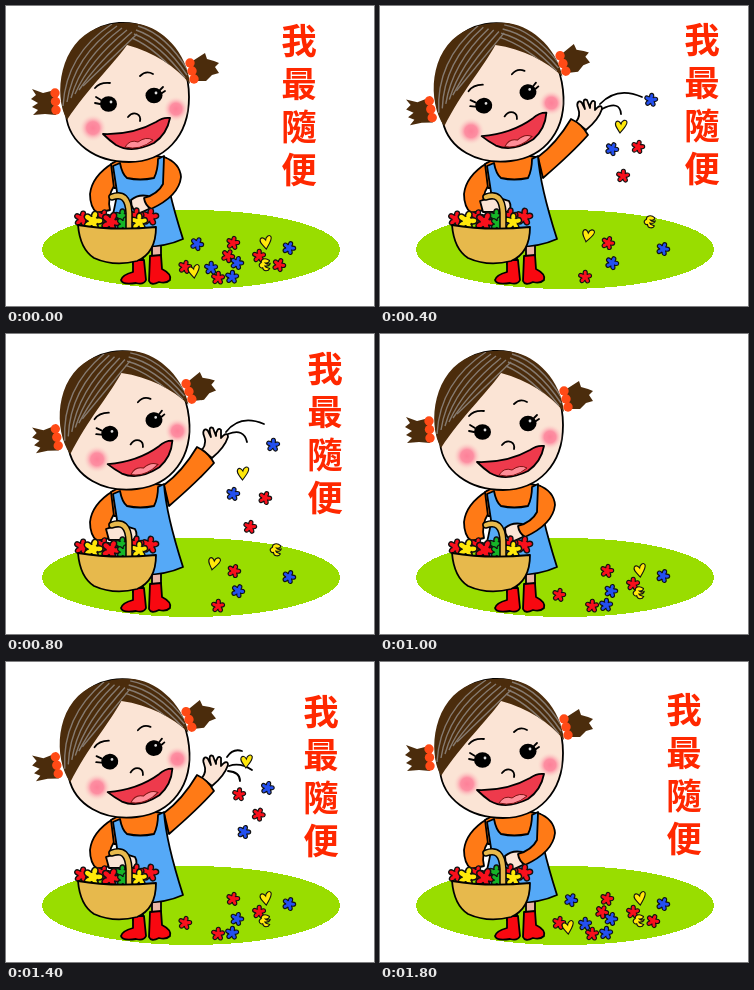
An HTML page that plays this animation: 368 px wide and 300 px high, repeating every 2000 ms.

```html
<!DOCTYPE html>
<html lang="zh-Hant">
<head>
<meta charset="utf-8">
<title>我最隨便</title>
<style>
html, body { margin: 0; width: 100%; height: 100%; overflow: hidden; background: #fff; }
svg { display: block; }
.ink { stroke: #000; stroke-width: 1.8; stroke-linejoin: round; stroke-linecap: round; }
.line { fill: none; }
.skin { fill: #fbe4d5; }
.leg { fill: #eab5a5; }
.orange { fill: #ff7a16; }
.blue { fill: #55a9f7; }
.red { fill: #f80810; }
.hair { fill: #4b2c0c; }
.tie { fill: #ff4a16; }
.bloom { stroke: #111; stroke-width: 1.1; }
#words { font: 700 35.5px "Noto Sans CJK TC", "Noto Sans CJK", "Noto Sans CJK JP", sans-serif; fill: #ff2800; text-anchor: middle; }
</style>
</head>
<body>
<svg width="368" height="300" viewBox="0 0 368 300">
  <defs>
    <radialGradient id="blush">
      <stop offset="0" stop-color="#fd8098"/>
      <stop offset=".45" stop-color="#fd8fa2"/>
      <stop offset="1" stop-color="#fbe4d5" stop-opacity="0"/>
    </radialGradient>
    <clipPath id="hairClip">
      <path id="hairShape" d="M61 114C47 88 54 37 91 22C106 16 121 16 133 18C156 22 181 46 184 78C170 61 148 46 121 39C106 60 82 82 61 114Z"/>
    </clipPath>
    <g id="flower"></g>
    <path id="heart" d="M-1 7C-4 2-7-1-5-4C-3-6-1-4 0-2C1-6 5-7 6-4C6 0 2 3-1 7Z"/>
    <path id="half" d="M4-5C-1-8-5-5-4-2C-8 1-4 4-2 3C-1 7 4 6 5 3C3 2 1 3 0 1C3 1 5 0 5-2C3-1 1-1 0-2C2-2 4-3 4-5Z"/>
  </defs>

  <ellipse cx="185" cy="243.5" rx="149" ry="39.5" fill="#99dd00" shape-rendering="crispEdges"/>
  <g id="ground"></g>

  <g class="ink">
    <path class="leg" d="M127 248H137V258H127ZM146 236H155V252H146Z"/>
    <path class="red" d="M127 254H138L140 274Q138 279 130 277Q116 279 115 274Q116 269 127 266Z"/>
    <path class="red" d="M144 250L155 249L156 263Q166 268 164 274Q160 278 153 276Q145 280 143 275Z"/>
    <path class="orange" d="M107 157Q86 170 84 188Q84 201 91 207L104 204Q101 191 108 180Z"/>
    <path class="orange" d="M105 158L120 150H150L160 152L161 182H108Z"/>
    <g id="waveArm">
      <path class="skin" d="M196 116C200 111 200 107 198 102C196 97 199 93 202 97L205 103C203 96 203 92 207 94L210 102C210 96 213 93 215 96L215 104C219 99 222 99 222 103C220 109 217 115 206 124Z"/>
      <path class="orange" d="M158 151Q176 138 191 113Q202 118 208 129Q192 147 163 172Z"/>
    </g>
    <path class="blue" d="M107 160L114 157Q116 168 121 172Q134 175 148 172Q152 164 152 153L158 150Q160 180 177 233Q155 243 125 240L102 225Q110 200 111 186Z"/>
    <g id="restArm">
      <path class="skin" d="M125 194Q132 188 142 190L147 201L134 207Q125 205 125 194Z"/>
      <path class="orange" d="M158 151Q174 157 175 171Q173 190 145 203Q139 199 138 192Q152 188 157 178Z"/>
    </g>
    <path id="foreArm" class="skin" d="M100 195Q114 189 129 195Q133 202 127 206L103 206Z"/>
    <g id="bunch"></g>
    <path class="line" d="M106 191Q122 185 123 207L123 223" stroke-width="7.500" style="stroke-width:7.500"/>
    <path class="line" d="M106 191Q122 185 123 207L123 223" style="stroke:#e7b94c;stroke-width:4.500"/>
    <path d="M72 219Q107 225 150 221Q150 247 131 255Q108 261 88 252Q74 243 72 219Z" fill="#e7b94c"/>
  </g>

  <g id="head">
    <path class="hair" d="M49 84L37 87L26 83L30 89L25 93L32 97L26 101L32 104L27 109L39 108L50 109Z"/>
    <path class="hair" d="M185 56L199 47L201 53L208 55L213 57L209 61L213 67L206 69L200 75L189 75Z"/>
    <path class="skin ink" d="M113 17C152 15 183 48 183 91C183 131 158 156 123 156C89 156 63 137 60 109C48 80 62 21 113 17Z"/>
    <use href="#hairShape" class="hair"/>
    <g id="strands" class="line" clip-path="url(#hairClip)" stroke="#857a70" stroke-width="1.400"></g>
    <g class="tie" id="ties"></g>
    <circle cx="87" cy="122" r="14" fill="url(#blush)"/>
    <circle cx="170" cy="103" r="13" fill="url(#blush)"/>
    <ellipse cx="102.500" cy="98" rx="8.500" ry="7.800"/>
    <ellipse cx="148" cy="89.500" rx="8.500" ry="7.800"/>
    <g fill="#ddd">
      <circle cx="105" cy="96" r="1.400"/>
      <circle cx="150" cy="87" r="1.400"/>
    </g>
    <path class="ink line" d="M95 94L90 91M94 98L89 97M154 84L157 81M156 87L159 85M89 82Q94 76 104 77M134 70Q140 64 147 68M122 111Q126 106 131 108Q135 110 134 115"/>
    <path class="ink" d="M97 128Q127 129 150 116Q157 111 164 112Q161 128 148 137Q126 148 110 139Q103 134 97 128Z" fill="#ee3a4c"/>
    <path d="M119 141Q124 133 132 136Q140 130 147 134Q134 145 119 141Z" fill="#ff8d98" stroke="#7c1515"/>
  </g>

  <path id="arcs" class="ink line"/>
  <g id="air"></g>
  <g id="words"></g>
</svg>
<script>
const $ = id => document.getElementById(id);
const STEP = 200, STEPS = 10;
const ink = { r: '#f8101c', b: '#2450f0', y: '#ffe80a', g: '#16b528' };

const bloom = (kind, x, y, scale = 1, shape = kind === 'y' ? 'heart' : 'flower') =>
  `<use href="#${shape}" class="bloom" fill="${ink[kind]}" transform="translate(${x} ${y}) rotate(${Math.round(x * 7 + 5) % 24 - 12}) scale(${scale})"/>`;
const blooms = list => list.map(f => bloom(...f)).join('');

// Five outlined petals around a plain middle
let petals = '';
for (let i = 0; i < 5; i++) {
  petals += `<ellipse cx="3.8" rx="2.9" ry="2.1" transform="rotate(${i * 72 - 75})"/>`;
}
$('flower').innerHTML = petals + '<circle r="2.9" stroke="none"/>';

$('bunch').innerHTML = blooms([
  ['g', 116, 211, 1.2], ['r', 76, 213, 1.2], ['r', 97, 211, 1.1], ['r', 144, 211, 1.3],
  ['r', 130, 210, 1.2], ['r', 105, 216, 1.5], ['g', 118, 218, 1.1],
  ['y', 87, 215, 1.5, 'flower'], ['y', 133, 216, 1.3, 'flower']
]);

let strands = '';
for (let i = 0; i < 6; i++) {
  strands += `<path d="M${57 + i * 4} ${100 - i * 4}Q${60 + i * 8} ${48 + i * 2} ${106 + i * 5} ${18 + i * 2}"/>`;
}
for (let i = 0; i < 4; i++) {
  strands += `<path d="M${132 - i * 2} ${20 + i * 4}Q${160 - i * 3} ${28 + i * 5} ${183 - i * 2} ${66 + i * 3}"/>`;
}
$('strands').innerHTML = strands;

$('ties').innerHTML = [0, 1, 2].map(i =>
  `<circle cx="${49 + i * 0.5}" cy="${87 + i * 8.5}" r="4.7"/><circle cx="${184 + i * 2}" cy="${57 + i * 8}" r="4.7"/>`).join('');

const few = [['y', 208, 229], ['y', 270, 216, 1, 'half'], ['r', 228, 237],
  ['b', 283, 243], ['b', 232, 257]];
const some = [['r', 227, 237], ['y', 260, 236], ['b', 283, 242], ['r', 253, 250],
  ['y', 259, 259, 1, 'half'], ['b', 231, 257], ['r', 179, 261], ['r', 212, 272], ['b', 226, 271]];
const many = [...some, ['b', 191, 238], ['r', 222, 250], ['r', 273, 259],
  ['y', 188, 265], ['b', 205, 262]];

// kind, start x and y, drift per step
const tossA = [['b', 271, 94, -2, 8.5], ['y', 241, 120, -2, 9.5], ['b', 232, 143, -2.5, 8.5],
  ['r', 258, 141, 0.5, 11.5], ['r', 243, 170, 0.5, 11.5], ['r', 205, 271, 3.5, 0.5]];
const tossB = [['y', 241, 94, -0.5, 5], ['b', 262, 121, -0.5, 5], ['r', 233, 127, 0, 5.5],
  ['r', 253, 142, -0.5, 10.5], ['b', 238, 159, 0, 11]];
const fall = (list, k) => list.map(([c, x, y, dx, dy]) => [c, x + dx * k, y + dy * k]);

const arcs = {
  2: 'M220 98Q237 80 262 91M222 103Q240 94 241 108',
  3: 'M220 98Q236 81 258 90M222 101Q240 94 241 108',
  4: 'M220 98Q234 80 258 90M222 100Q238 94 241 108',
  6: 'M221 97Q229 85 241 89M224 105Q244 99 257 113M223 108Q237 108 237 119',
  7: 'M221 95Q227 86 236 89M223 104Q234 100 246 108M222 109Q234 110 234 119',
  8: 'M222 93Q225 87 231 88M222 104L235 103M221 109Q230 112 231 119'
};
const wordSpots = {
  0: [293, 35], 2: [322, 34], 3: [319, 35], 4: [319, 35],
  7: [315, 50], 8: [314, 51], 9: [304, 48]
};

function draw(step) {
  const wave = step in arcs;
  $('head').setAttribute('transform', wave ? 'rotate(-6.5 118 88)' : '');
  $('waveArm').style.display = $('foreArm').style.display = wave ? '' : 'none';
  $('restArm').style.display = wave ? 'none' : '';
  $('arcs').setAttribute('d', arcs[step] || '');

  const ground = step === 1 ? [] : step === 0 || step === 9 ? many : step < 5 ? few : some;
  $('ground').innerHTML = blooms(ground);
  const air = !wave ? [] : step < 5 ? fall(tossA, step - 2) : fall(tossB, step - 6);
  $('air').innerHTML = blooms(air);

  const spot = wordSpots[step];
  $('words').innerHTML = spot ? [...'我最隨便'].map((c, i) =>
    `<text x="${spot[0]}" y="${spot[1] + 13 + i * 43}">${c}</text>`).join('') : '';
}

let shown = -1;
function tick() {
  const step = Math.floor(performance.now() / STEP) % STEPS;
  if (step !== shown) draw(shown = step);
  requestAnimationFrame(tick);
}
tick();
</script>
</body>
</html>
```
